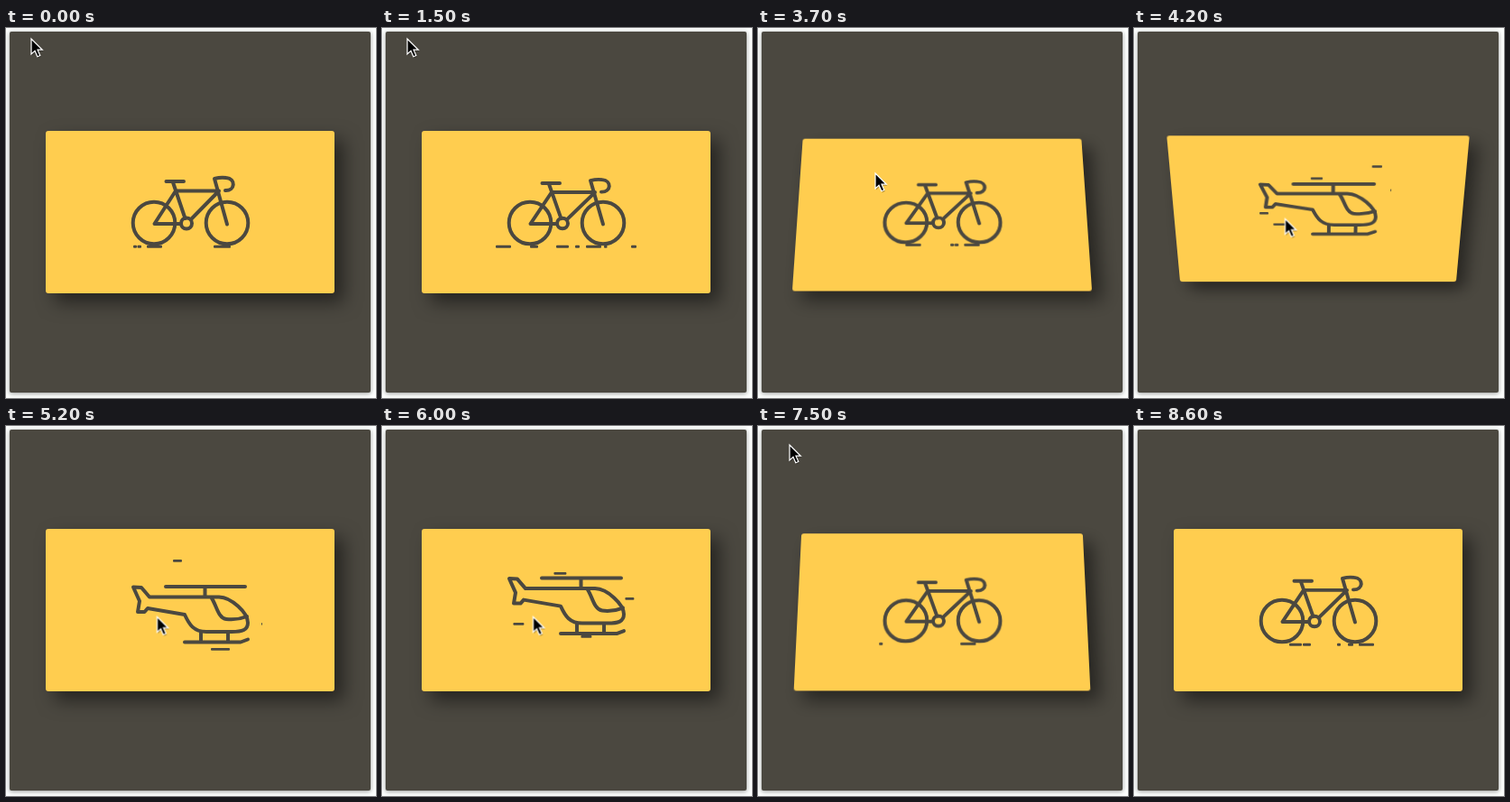
An HTML page for the animation above (8.7 s loop, 410 by 410 pixels).

```html
<!DOCTYPE html>
<html lang="en">
<head>
<meta charset="utf-8">
<title>Flip card</title>
<style>
  :root { --ink: #4b4840; --sun: #ffcd4f; }
  html, body { margin: 0; width: 100%; height: 100%; overflow: hidden; background: #fcfefd; }
  .panel {
    position: absolute; left: 4px; top: 4px; width: 400px; height: 400px;
    border-radius: 2px; background: var(--ink);
    box-shadow: 0 1px 5px rgba(0, 0, 0, .4);
  }
  .scene { position: absolute; left: 44px; top: 114px; width: 320px; height: 180px; perspective: 860px; }
  .card, .face { position: absolute; inset: 0; }
  .card { transform-style: preserve-3d; }
  .face {
    border-radius: 3px; background: var(--sun);
    box-shadow: 10px 10px 20px rgba(0, 0, 0, .5);
    backface-visibility: hidden;
  }
  .back { transform: rotateX(180deg); }
  .face svg { display: block; width: 320px; height: 180px; }
  .line { fill: none; stroke: var(--ink); stroke-width: 4; stroke-linecap: round; stroke-linejoin: round; }
  .dashes { fill: var(--ink); }
  .cursor { position: absolute; left: 0; top: 0; width: 20px; height: 26px; overflow: visible; }
</style>
</head>
<body>
<div class="panel"></div>
<div class="scene">
  <div class="card" id="card">
    <div class="face">
      <svg viewBox="44 114 320 180">
        <clipPath id="road"><rect x="124" y="230" width="160" height="20"/></clipPath>
        <g class="dashes" id="ground" clip-path="url(#road)"></g>
        <g class="line">
          <circle cx="164" cy="216" r="23.3"/>
          <circle cx="245" cy="216" r="23.3"/>
          <g id="frame">
            <circle cx="200" cy="216.5" r="6"/>
            <path d="M194 217H164.500L188 180.500H236L205 212M185 171L198.500 211M177.500 170H197"/>
            <path d="M245 217.500L231 167Q238 165 244 166C255 167 254 180.500 243 180"/>
          </g>
        </g>
      </svg>
    </div>
    <div class="face back">
      <svg viewBox="44 114 320 180">
        <clipPath id="sky"><rect x="124" y="140" width="160" height="120"/></clipPath>
        <g class="dashes" id="wind" clip-path="url(#sky)"></g>
        <g class="line" id="heli">
          <path d="M177 178H265M220.500 180V188"/>
          <path d="M159 189.500H236C250 190 268 207 268 218C268 226 262 228 250 228H222C208 228 203 220 198 209L157 202L153.500 206H146L148 194L141 178.500L150 179Z"/>
          <path d="M228 191C233 198 235 213 244 214C252 215 262 213 267 211"/>
          <path d="M216 229V238M246 229V238M198 239.500H260L268 236.500"/>
        </g>
      </svg>
    </div>
  </div>
</div>
<svg class="cursor" id="cursor" viewBox="0 0 20 26">
  <path d="M0 0V17L4 13.300L6.800 19.800L9.800 18.500L7 12.200H12.300Z" transform="translate(1 1.500)" fill="#000" opacity=".3"/>
  <path d="M0 0V17L4 13.300L6.800 19.800L9.800 18.500L7 12.200H12.300Z" fill="#000" stroke="#fff" stroke-width="1.200"/>
</svg>
<script>
const LOOP = 8700;
const $ = id => document.getElementById(id);

// The picture advances in uneven steps.
const steps = [
  ...Array.from({ length: 25 }, (_, i) => i * 100),
  2800, 3000, 3200, 3400, 3600, 3700, 3900, 4000, 4200, 4400, 4500, 4600, 4800,
  5000, 5200, 5400, 5500, 5600, 5800, 5900, 6000, 6200, 6400, 6600, 6800, 7000,
  7300, 7500, 7700, 8100, 8600
];

// Paused timelines, moved by hand to the current step.
function timeline(el, keys) {
  const frames = keys.map(([t, props]) => ({ offset: t / LOOP, ...props }));
  const anim = el.animate(frames, { duration: LOOP, fill: 'both' });
  anim.pause();
  return anim;
}

const turn = (t, deg, easing = 'linear') => [t, { transform: `rotateX(${deg}deg)`, easing }];
const flip = timeline($('card'), [
  turn(0, 0), turn(3465, 0, 'ease-in-out'), turn(4465, 180),
  turn(6700, 180, 'ease-in-out'), turn(7700, 0), turn(LOOP, 0)
]);

const path = [
  [0, 28, 12], [2100, 28, 12], [2200, 29, 12], [2400, 29, 12], [2800, 30, 21],
  [3200, 52, 50], [3500, 100, 118], [3900, 160, 204], [4200, 167.500, 211.500],
  [6200, 167.500, 211.500], [6400, 166, 200], [6700, 105, 110], [6800, 60, 42],
  [7000, 33, 38], [7300, 29, 27], [7700, 41, 15], [8100, 41, 4], [LOOP, 41, 4]
];
const pointer = timeline($('cursor'),
  path.map(([t, x, y]) => [t, { transform: `translate(${x}px, ${y}px)` }]));

// Dashes sit on a belt that runs to the left: [start, length, lane].
function belt(group, dashes, top, speed, height) {
  const rects = dashes.map(([, len, lane = 0]) => {
    const r = document.createElementNS('http://www.w3.org/2000/svg', 'rect');
    const attrs = { y: top + lane * 14, width: len, height, rx: 1 };
    for (const k in attrs) r.setAttribute(k, attrs[k]);
    group.append(r);
    return r;
  });
  return t => rects.forEach((r, i) => r.setAttribute('x', dashes[i][0] - speed * t));
}

const early = [
  [141, 4], [145.500, 4.500], [156, 17], [230, 19],
  [306, 17], [344, 9], [373, 14], [394, 5], [406, 17], [426, 3.500],
  [456, 6], [466, 19], [519, 4], [608, 17]
];
const late = [[1204, 14], [1219, 9], [1257, 4], [1269, 6], [1281, 17]];
const ground = belt($('ground'),
  [...early, ...early.map(([u, len]) => [u + 516, len]), ...late], 240.800, .12, 3);

const wind = belt($('wind'), [
  [20, 10, 0], [40, 14, 3], [90, 18, 6],
  [262, 11, 0], [196, 13, 1], [139, 10, 4], [154, 14, 5], [283, 12, 2],
  [357, 10, 0], [399, 21, 7], [455, 12, 5], [500, 14, 1], [530, 12, 6],
  [658, 11, 0], [702, 15, 1], [579, 10, 3], [700, 21, 7], [760, 16, 4], [790, 12, 6]
], 148, .172, 2.800);

const wave = (t, period) => (1 - Math.cos(2 * Math.PI * t / period)) / 2;

function draw(t) {
  flip.currentTime = pointer.currentTime = t;
  $('cursor').style.visibility = t < 8600 ? 'visible' : 'hidden';
  ground(t);
  wind(t - 4200);
  // The frame sinks towards the axles; the helicopter rises and falls.
  const squash = 1 - .042 * wave(t, 1000);
  $('frame').setAttribute('transform', `translate(0 217) scale(1 ${squash}) translate(0 -217)`);
  $('heli').setAttribute('transform', `translate(0 ${-9.400 * wave(t - 5200, 1600)})`);
}

const start = performance.now();
function tick() {
  const now = (performance.now() - start) % LOOP;
  draw(steps.findLast(s => s <= now));
  requestAnimationFrame(tick);
}
tick();
</script>
</body>
</html>
```
